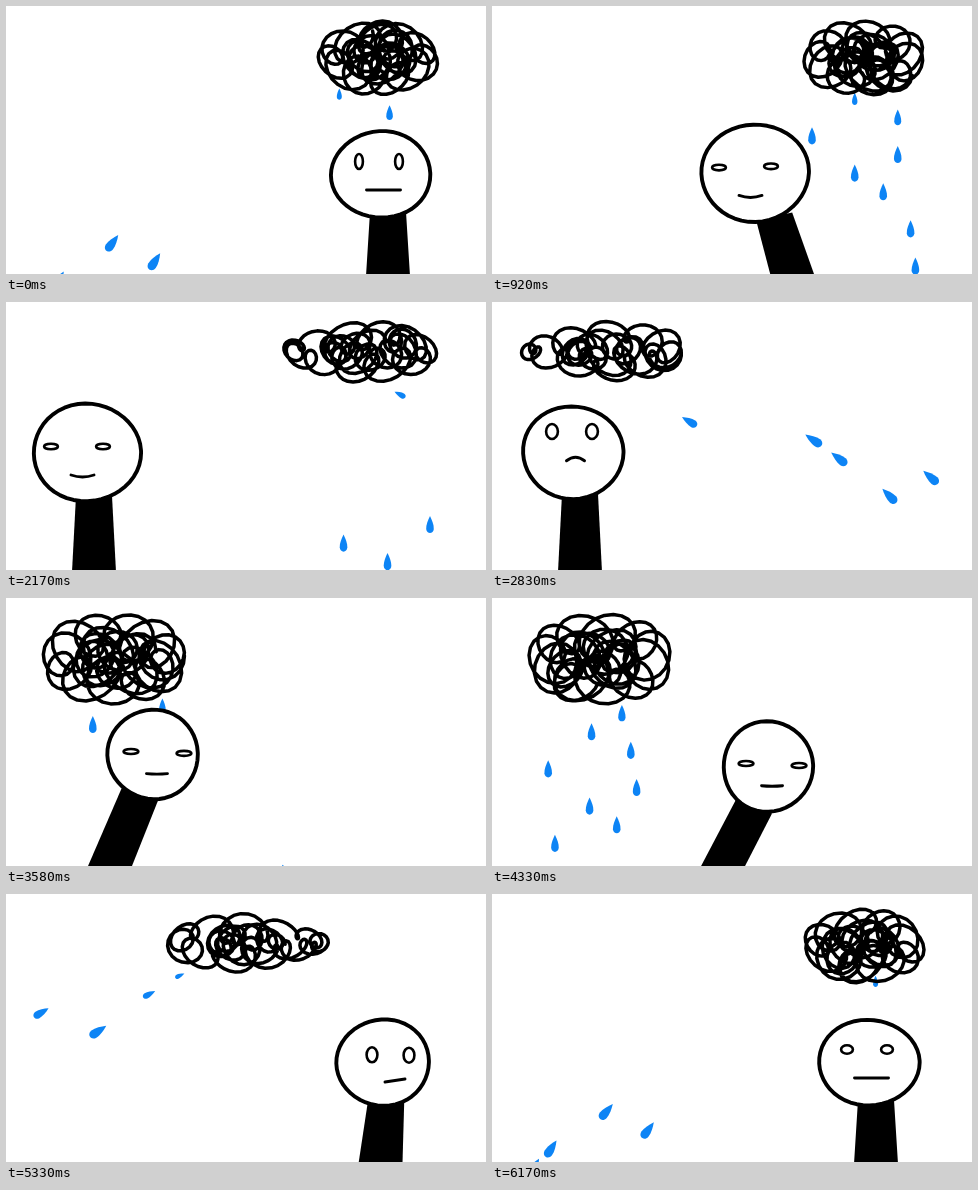
Animation of 480 by 268 pixels, one loop 6260 ms. Source, as an HTML page with a canvas:

```html
<!DOCTYPE html>
<html lang="en">
<head>
<meta charset="utf-8">
<title>Rain cloud</title>
<style>
  html, body { margin: 0; width: 100%; height: 100%; overflow: hidden; background: #fff; }
  canvas { display: block; }
</style>
</head>
<body>
<canvas id="stage" width="480" height="268"></canvas>
<script>
const LOOP = 6260, FRAMES = 75, FRAME = 1000 / 12;
const INK = '#000', WATER = '#0d84f5', PAPER = '#fff';
const ctx = document.getElementById('stage').getContext('2d');

// The person walks away, then the cloud flies after: once to the left, once back.
const walks = [{ from: 250, to: 2000 }, { from: 3200, to: 4920 }];
const flights = [{ from: 2030, to: 2880, dir: -1 }, { from: 4900, to: 5760, dir: 1 }];

const mix = (a, b, k) => a + (b - a) * k;
const ramp = (t, from, to) => Math.min(1, Math.max(0, (t - from) / (to - from)));
const ease = (t, from, to) => { const k = ramp(t, from, to); return k * k * (3 - 2 * k); };
const swell = (t, [a, b, c, d]) => ramp(t, a, b) - ramp(t, c, d);
const wrap = t => ((t % LOOP) + LOOP) % LOOP;

function randomFrom(seed) {
  return () => {
    seed = (seed + 0x6D2B79F5) | 0;
    let n = Math.imul(seed ^ (seed >>> 15), 1 | seed);
    n = (n + Math.imul(n ^ (n >>> 7), 61 | n)) ^ n;
    return ((n ^ (n >>> 14)) >>> 0) / 4294967296;
  };
}

// --- Person ---

const calm = {
  rx: 50, ry: 43, lean: 0, eyeX: -2, eyeY: -13, gap: 20, eyeW: 4.5, eyeH: 8,
  mouthX: 2.5, mouthY: 15.5, mouthW: 17, bend: 0, tilt: 0
};

// Each mood adds its changes to the calm pose while it swells up and fades.
const moods = [
  { name: 'smug', when: [250, 600, 2500, 2700], change: {
    rx: 4, ry: 5.5, eyeX: -8, eyeY: 7, gap: 6, eyeW: 3, eyeH: -4.7,
    mouthX: -7, mouthY: 8, mouthW: -5.5, bend: 4 } },
  { name: 'sad', when: [2600, 2750, 3200, 3450], change: {
    ry: 3.5, eyeX: 1, eyeY: -8, eyeW: 2, mouthY: -9, mouthW: -8, bend: -7 } },
  { name: 'sly', when: [3200, 3500, 4800, 5000], change: {
    rx: -5, ry: 2, eyeX: 6.5, eyeY: 11, gap: 6.5, eyeW: 3.5, eyeH: -5,
    mouthX: 1.5, mouthY: 4, mouthW: -6.5, bend: 1 } },
  { name: 'wary', when: [4900, 5150, 5900, 6100], change: {
    rx: -3.5, lean: 0.18, eyeX: 9.5, eyeY: 5.5, gap: -1.5, eyeW: 1.5,
    mouthX: 9.5, mouthY: 2.5, mouthW: -7, tilt: -1.5 } },
  { name: 'blink', when: [6080, 6160, 6180, 6260], change: { eyeW: 2, eyeH: -3.3 } },
  { name: 'walk left', when: [250, 1400, 1850, 2050], change: { lean: -1 } },
  { name: 'walk right', when: [3200, 3600, 4700, 4950], change: { lean: 1 } }
];

const headX = t => {
  const [away, back] = walks.map(w => ramp(t, w.from, w.to));
  return 375 - 294 * away + 296 * back;
};

function personAt(t) {
  const p = { ...calm, x: headX(t), y: 168.5 - 18 * (ease(t, 700, 1900) - ease(t, 3200, 4200)) };
  for (const { when, change } of moods) {
    const k = swell(t, when);
    for (const part in change) p[part] += k * change[part];
  }
  return p;
}

function ring(x, y, rx, ry) {
  ctx.beginPath();
  ctx.ellipse(x, y, rx, ry, 0, 0, 2 * Math.PI);
  ctx.stroke();
}

function drawBody(p) {
  const neckX = p.x + 7 - 21 * p.lean, neckY = p.y + p.ry - 5;
  const footX = p.x + 7 - 53 * p.lean, slant = -7 * p.lean;
  ctx.fillStyle = INK;
  ctx.beginPath();
  ctx.moveTo(neckX - 18, neckY + slant);
  ctx.lineTo(neckX + 18, neckY - slant);
  ctx.lineTo(footX + 22, 270);
  ctx.lineTo(footX - 22, 270);
  ctx.fill();
}

function drawHead(p, frame) {
  const rnd = randomFrom(frame + 31), p2 = rnd() * 6.3, p3 = rnd() * 6.3;
  ctx.beginPath();
  for (let a = 0; a < 6.28; a += 0.13) {
    const k = 1 + 0.007 * Math.sin(2 * a + p2) + 0.009 * Math.sin(3 * a + p3);
    ctx.lineTo(p.x + p.rx * k * Math.cos(a), p.y + p.ry * k * Math.sin(a));
  }
  ctx.closePath();
  ctx.fillStyle = PAPER;
  ctx.fill();
  ctx.lineWidth = 3.9;
  ctx.stroke();

  ctx.lineWidth = 2.6;
  for (const side of [-1, 1]) {
    ring(p.x + p.eyeX + side * p.gap, p.y + p.eyeY + side * p.lean, p.eyeW - 0.6, p.eyeH - 0.5);
  }
  const x = p.x + p.mouthX, y = p.y + p.mouthY;
  ctx.lineWidth = 2.9;
  ctx.beginPath();
  ctx.moveTo(x - p.mouthW, y - p.tilt - p.bend / 4);
  ctx.quadraticCurveTo(x, y + p.bend * 0.75, x + p.mouthW, y + p.tilt - p.bend / 4);
  ctx.stroke();
}

// --- Cloud ---

// In flight the cloud stretches, flattens and narrows towards its front.
function cloudAt(t) {
  const [away, back] = flights.map(f => ease(t, f.from, f.to));
  const left = away - back;
  const [blowLeft, blowRight] = flights.map(f => swell(t, [f.from, f.from + 170, f.to - 50, f.to + 120]));
  const blow = blowLeft + blowRight;
  return {
    x: 372 - 264 * left,
    y: mix(52 + 9 * left, 49, blow),
    w: mix(60 + 11 * left, 81, blow),
    h: mix(37 + 8 * left, 29.5, blow),
    thrust: blowRight - blowLeft
  };
}

// One pen line curls along an outer oval, then along an inner one.
function drawCloud(c, frame) {
  const rnd = randomFrom(frame * 97 + 5);
  const start = rnd() * 6.3, phase = rnd() * 6.3, loops = 24, steps = 18;
  ctx.lineWidth = 3.5;
  ctx.beginPath();
  for (let i = 0; i <= loops * steps; i++) {
    const turn = i / steps;
    const orbit = start + turn / loops * 4 * Math.PI;
    const reach = mix(1, 0.4, ramp(turn, loops * 0.5, loops * 0.65));
    const px = Math.cos(orbit) * reach, py = Math.sin(orbit) * reach;
    const h = c.h * (1 - 0.4 * Math.max(0, px * c.thrust));
    const r = h * (0.42 + 0.1 * Math.sin(turn * 1.9 + phase));
    const a = turn * 2 * Math.PI;
    ctx.lineTo(
      c.x + px * (c.w - r) + r * Math.cos(a),
      c.y + py * (h - r) + r * Math.sin(a + 0.3 * Math.sin(turn + phase))
    );
  }
  ctx.stroke();
}

// --- Rain ---

const DROPS = 70, FALL = 0.208, START_Y = 65, DRAG = 700;
const HIT_Y = 150, HIT_RADIUS = 50;

// The rain dries up before each flight and again from braking until after landing.
const isRaining = t => flights.every(({ from, to }) => {
  const brake = mix(from, to, 0.65);
  return !(t > from - 600 && t < from) && !(t > brake && t < to + 250);
});

const driftBy = (drift, age) => drift * (1 - Math.exp(-age / DRAG));

// Drops leave alternate sides of the cloud; in flight they are flung backwards.
function makeDrop(i) {
  const born = 66 + i * LOOP / DROPS;
  const side = i % 2 ? 1 : -1;
  const x = cloudAt(born).x + side * (30 + 22 * Math.cos(1.4 * (i - 6)));
  const flight = flights.find(f => born > f.from && born < f.to);
  const drift = flight ? -185 * flight.dir : 0;
  const hitAge = (HIT_Y - START_Y) / FALL;
  const miss = Math.abs(x + driftBy(drift, hitAge) - headX(wrap(born + hitAge)));
  return { born, x, drift, endY: miss < HIT_RADIUS ? HIT_Y : 280 };
}

const drops = Array.from({ length: DROPS }, (_, i) => makeDrop(i)).filter(d => isRaining(d.born));

function drawDrop(drop, t, cloud) {
  const age = wrap(t - drop.born);
  const y = START_Y + FALL * age;
  if (y < cloud.y + cloud.h - 5 || y > drop.endY) return;
  const slide = drop.drift / DRAG * Math.exp(-age / DRAG);
  const size = Math.min(drop.drift ? 1.15 : 1, 0.4 + (y - START_Y) / 90);
  ctx.save();
  ctx.translate(drop.x + driftBy(drop.drift, age), y);
  ctx.rotate(-Math.atan(1.9 * slide / FALL));
  ctx.scale(size, size);
  ctx.beginPath();
  ctx.moveTo(0, -9);
  ctx.bezierCurveTo(2, -5, 4, 0, 3.8, 4);
  ctx.bezierCurveTo(3.4, 9.5, -3.4, 9.5, -3.8, 4);
  ctx.bezierCurveTo(-4, 0, -2, -5, 0, -9);
  ctx.fillStyle = WATER;
  ctx.fill();
  ctx.restore();
}

function draw() {
  const frame = Math.min(FRAMES - 1, Math.floor((performance.now() % LOOP + 4) / FRAME));
  const t = frame * FRAME;
  const person = personAt(t), cloud = cloudAt(t);
  ctx.fillStyle = PAPER;
  ctx.fillRect(0, 0, 480, 268);
  ctx.strokeStyle = INK;
  ctx.lineCap = ctx.lineJoin = 'round';
  drops.forEach(drop => drawDrop(drop, t, cloud));
  drawCloud(cloud, frame);
  drawBody(person);
  drawHead(person, frame);
  requestAnimationFrame(draw);
}
draw();
</script>
</body>
</html>
```
